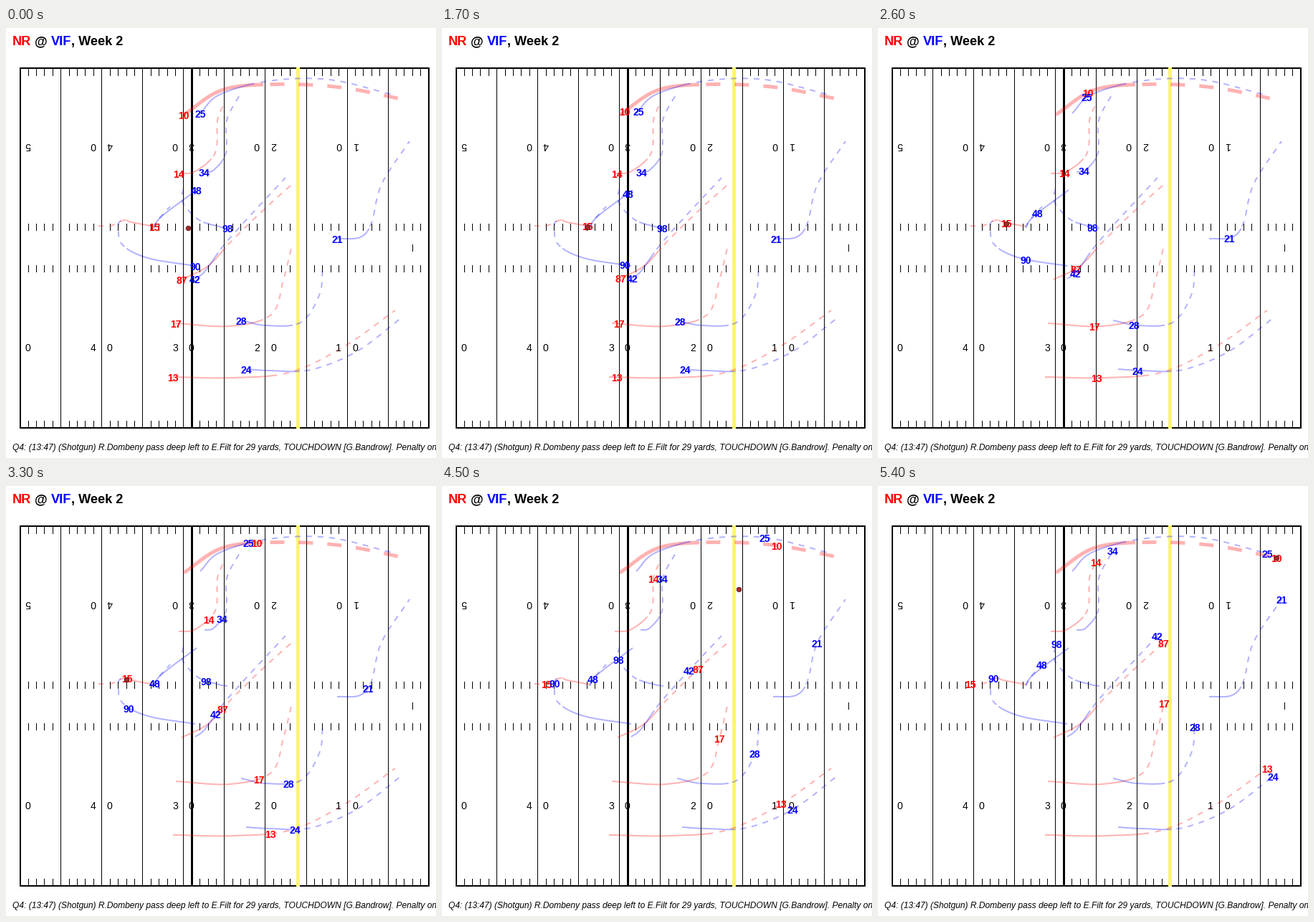
Write a matplotlib script that moves like this. It is 600x600 px and loops after 6.5 s.

```python
import numpy as np
import matplotlib.pyplot as plt
from matplotlib.animation import FuncAnimation
from matplotlib.patches import Rectangle

SIZE, DPI = 600, 100
STEP, FRAMES, LAST = 100, 65, 54   # the final pose holds to the end of the loop
SNAP, IN_HAND, RELEASE, CATCH = 10, 16, 33, 50
LEFT, YARD, TOP, BOTTOM = 19.17, 11.41, 56, 558
RED, BLUE = "#ff0000", "#0000ff"

plt.rcParams["font.family"] = "Liberation Sans"
fig = plt.figure(figsize=(SIZE / DPI, SIZE / DPI), dpi=DPI, facecolor="white")
ax = fig.add_axes([0, 0, 1, 1])
ax.set(xlim=(0, SIZE), ylim=(SIZE, 0))
ax.axis("off")


def px(n):
    """Pixels to points."""
    return n * 72 / DPI


def write(x, y, s, size=14, **kw):
    return ax.text(x, y, s, fontsize=px(size), va="baseline", **kw)


def bars(x, y0, y1, color="black", width=1):
    """Vertical lines centred on whole pixel columns."""
    ax.vlines(np.round(x) + .5, y0, y1, color=color, lw=px(width),
              snap=False, zorder=1)


def draw_field():
    ax.add_patch(Rectangle((20, TOP), 570, BOTTOM - TOP, fill=False,
                           ec="black", lw=px(2), zorder=1))
    yards = np.arange(1, 50)
    bars(LEFT + YARD * yards[yards % 5 == 0], TOP, BOTTOM)
    ticks = LEFT + YARD * yards[yards % 5 > 0]
    for y in (57, 273, 331, 548):
        bars(ticks, y, y + 10)
    bars(LEFT + 48 * YARD, 302, 312)
    bars(259, TOP, BOTTOM, width=3)
    bars(407, TOP - 1, BOTTOM + 1, "#fbf66c", 5)
    flip = dict(rotation=180, rotation_mode="anchor")
    for k, digit in enumerate("54321"):
        mid = LEFT + 10 * YARD * k
        write(mid + YARD, 160, digit, ha="center", **flip)
        write(mid + YARD, 451, "0", ha="center")
        if k:
            write(mid - YARD, 160, "0", ha="center", **flip)
            write(mid - YARD, 451, digit, ha="center")


def draw_text():
    title = ((9, "NR", RED), (40.3, "@", "black"),
             (63.1, "VIF", BLUE), (91.4, ", Week 2", "black"))
    for x, s, color in title:
        write(x, 24, s, 18.2, color=color, weight="bold")
    write(9, 589, "Q4: (13:47) (Shotgun) R.Dombeny pass deep left to E.Filt "
          "for 29 yards, TOUCHDOWN [G.Bandrow]. Penalty on", 12, style="italic")


def progress():
    """Share of a route covered at each step: slow start, then steady."""
    t = np.arange(LAST + 1)
    run = np.where(t < 26, 7.5 * (t / 26) ** 4.5, t - 18.5)
    return run / run[-1]


def spline(points, s):
    """Catmull-Rom curve through evenly timed points, s from 0 to 1."""
    p = np.array(points, float)
    p = np.vstack([2 * p[0] - p[1], p, 2 * p[-1] - p[-2]])
    spans = len(points) - 1
    i = np.minimum((s * spans).astype(int), spans - 1)
    u = (s * spans - i)[:, None]
    a, b, c, d = (p[i + k] for k in range(4))
    return b + u / 2 * (c - a + u * (2 * a - 5 * b + 4 * c - d
                                     + u * (3 * (b - c) + d - a)))


pace = progress()
routes, labels = {}, {}


def player(number, color, *points, width=2):
    p = routes[number] = spline(points, pace)
    style = dict(color=color, alpha=.3, lw=px(width), zorder=2)
    ax.plot(*p[:RELEASE + 2].T, solid_capstyle="butt", **style)
    ax.plot(*p[RELEASE + 2:].T, ls=(0, (4, 4)), dash_capstyle="butt", **style)
    labels[number] = write(*p[0], str(number), color=color, weight="bold",
                           ha="center", zorder=4)


def ball_at(i):
    passer, receiver = routes[15], routes[10]
    spot = np.array([254, 279])
    if i < IN_HAND:
        k = max(0, i - SNAP) / (IN_HAND - SNAP)
        return spot + k * (passer[IN_HAND] - spot)
    if i <= RELEASE:
        return passer[i] + (0, 1.5)
    if i < CATCH:
        k = (i - RELEASE) / (CATCH - RELEASE)
        return passer[RELEASE] + k * (receiver[CATCH] - passer[RELEASE])
    return receiver[i]


draw_field()
draw_text()

player(10, RED, (248, 121), (303, 86), (380, 78.5), (468, 83), (556, 100), width=5)
player(13, RED, (233, 487), (318, 488), (398, 480), (474, 443), (543, 394))
player(14, RED, (241, 203), (264, 200), (292, 174), (295, 129), (304, 106))
player(15, RED, (207, 277), (175, 271), (165, 268), (146, 276), (129, 276))
player(17, RED, (237, 412), (313, 416), (370, 400), (387, 352), (399, 303))
player(87, RED, (245, 351), (282, 332), (315, 297), (358, 255), (398, 219))
player(21, BLUE, (462, 294), (494, 292), (510, 272), (524, 218), (563, 158))
player(24, BLUE, (335, 476), (369, 478), (425, 477), (490, 451), (551, 405))
player(25, BLUE, (271, 119), (298, 93), (366, 74), (451, 72), (543, 94))
player(28, BLUE, (328, 408), (363, 415), (411, 411), (437, 373), (442, 336))
player(34, BLUE, (277, 201), (290, 198), (307, 174), (308, 129), (328, 90))
player(42, BLUE, (264, 350), (278, 339), (304, 303), (345, 257), (390, 209))
player(48, BLUE, (266, 226), (217, 263), (207, 278), (211, 269), (229, 249))
player(90, BLUE, (264, 332), (198, 321), (162, 302), (157, 275), (161, 268))
player(98, BLUE, (309, 279), (297, 277), (268, 267), (246, 242), (249, 220))

ball, = ax.plot([], [], "o", ms=px(6.4), mfc="brown", mec="#5a1414",
                mew=px(.9), zorder=5)


def update(frame):
    i = min(frame, LAST)
    for number, label in labels.items():
        x, y = routes[number][i]
        label.set_position((x, y + 5.8))
    x, y = ball_at(i)
    ball.set_data([x], [y])
    return [ball, *labels.values()]


anim = FuncAnimation(fig, update, frames=FRAMES, interval=STEP,
                     repeat=True, repeat_delay=0, blit=False)
plt.show()
```
